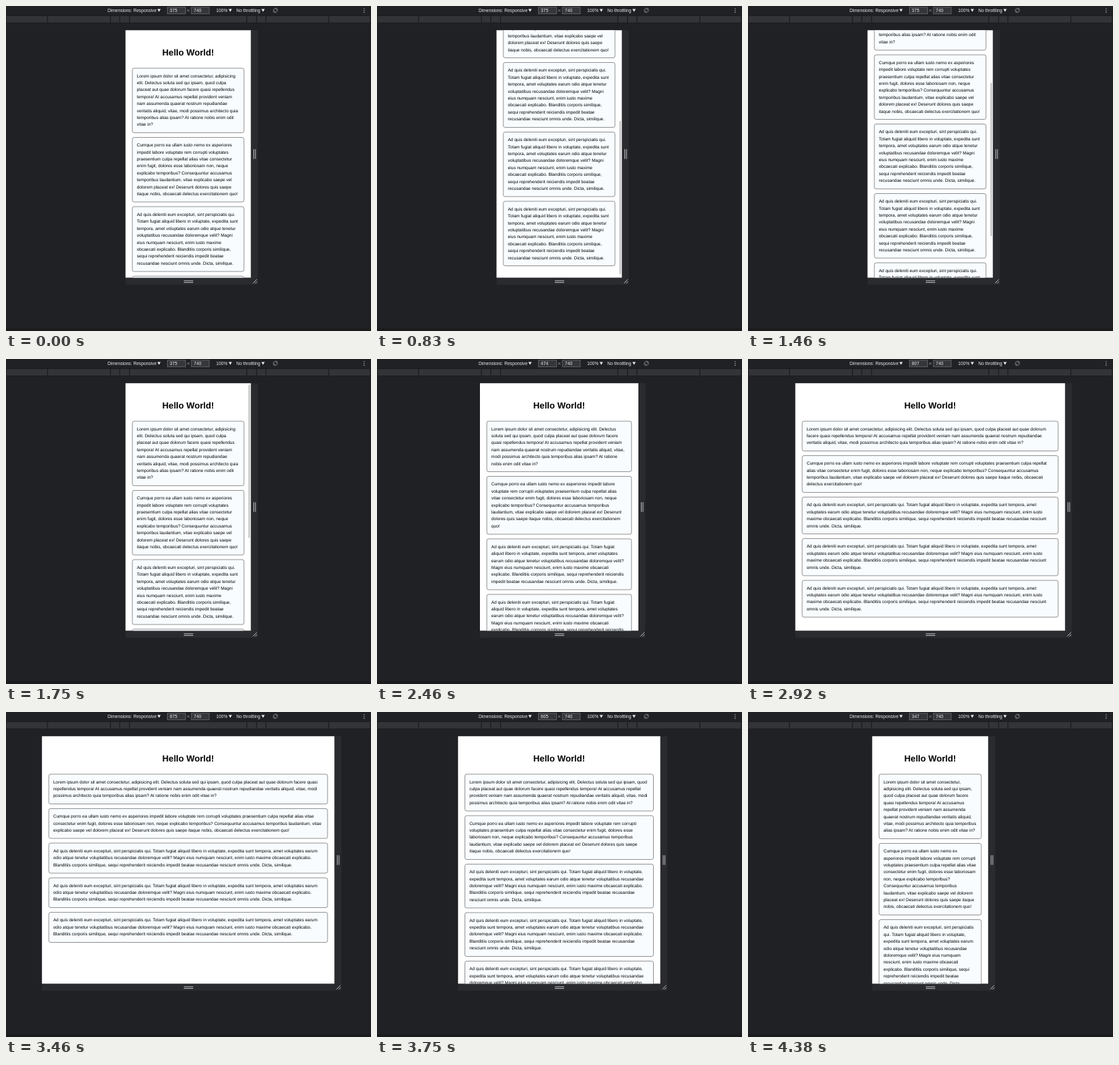
Animation, 546 px wide and 486 px high, one loop 5.21 s. Source, as an HTML page:

```html
<!DOCTYPE html>
<html lang="en">
<head>
<meta charset="utf-8">
<title>Responsive preview</title>
<style>
  html, body { margin: 0; width: 100%; height: 100%; overflow: hidden; background: #202124; }
  #stage { position: relative; width: 546px; height: 486px; overflow: hidden; background: #202124; }
  #chrome { position: absolute; left: 0; top: 0; }
  #chrome text { font: 6.65px "Liberation Sans", Arial, sans-serif; fill: #e8eaed; }
  #view {
    position: absolute; left: 0; top: 0; height: 740px; overflow: hidden;
    background: #fff; transform-origin: 0 0;
  }
  #page {
    box-sizing: border-box; padding: 20px;
    font: 13px/1.6 "Liberation Sans", Arial, sans-serif; color: #000;
    text-rendering: geometricPrecision;
  }
  h1 { margin: 25.5px 0; font-size: 26.4px; line-height: 41.6px; text-align: center; }
  #page p {
    margin: 0 0 13px; padding: 13px; border: 1px solid #222;
    border-radius: 6px; background: #f8fcff;
  }
  #thumb {
    position: absolute; right: 3px; width: 4px; height: 459px;
    border-radius: 2px; background: #bcbcbc;
  }
</style>
</head>
<body>
<div id="stage">
  <svg id="chrome" width="546" height="486" viewBox="0 0 546 486">
    <rect y="15" width="546" height="10" fill="#333438"/>
    <path id="ticks" stroke="#17181a" stroke-width="1.1"/>
    <path d="M0 14.3H546M0 25.2H546" stroke="#1a1b1d" stroke-width=".8"/>
    <rect y="482" width="546" height="4" fill="#1a1b1d"/>

    <text x="152" y="9">Dimensions: Responsive</text>
    <g fill="#35363a" stroke="#6a6d71" stroke-width=".8">
      <rect x="241.4" y="1.9" width="27.2" height="9.8"/>
      <rect x="277.2" y="1.9" width="26.8" height="9.8"/>
    </g>
    <text id="width" x="245" y="9">375</text>
    <path d="M270.8 5l3.6 3.6m0-3.6l-3.6 3.6" stroke="#9aa0a6" stroke-width=".7"/>
    <text x="281" y="9">740</text>
    <text x="314.3" y="9">100%</text>
    <text x="344.5" y="9">No throttling</text>
    <path d="M226.4 4.6h5l-2.5 4.2zM333 4.6h5l-2.5 4.2zM382 4.6h5l-2.5 4.2z" fill="#e8eaed"/>
    <g fill="none" stroke="#9aa0a6" stroke-width=".8">
      <rect x="401.2" y="3.7" width="3.6" height="5.6" transform="rotate(-45 403 6.5)"/>
      <path d="M399.6 7.2a3.5 3.5 0 0 0 3 2.8M406.4 5.8a3.5 3.5 0 0 0-3-2.8"/>
    </g>
    <g fill="#9aa0a6">
      <circle cx="535.7" cy="4" r=".8"/><circle cx="535.7" cy="6.7" r=".8"/><circle cx="535.7" cy="9.4" r=".8"/>
    </g>

    <rect id="frame" y="36.25" height="380.5" fill="#2a2b2e"/>
    <g fill="none" stroke="#c0c2c5" stroke-width="1">
      <path d="M266 410.9h14M266 413.4h14"/>
      <path id="grips" d="M4.4 214.2v14.5M6.9 214.2v14.5M3.2 414.6l5.8-5.8M6.4 414.8l2.8-2.8"/>
    </g>
  </svg>
  <div id="view">
    <div id="page"><h1>Hello World!</h1></div>
    <div id="thumb"></div>
  </div>
</div>
<script>
const $ = id => document.getElementById(id);
const LOOP = 5210, FRAME = 1000 / 24, CENTER = 272.5, TOP = 36.25, SCROLL_MAX = 431;

const repeated = "Ad quis deleniti eum excepturi, sint perspiciatis qui. Totam fugiat aliquid libero in voluptate, expedita sunt tempora, amet voluptates earum odio atque tenetur voluptatibus recusandae doloremque velit? Magni eius numquam nesciunt, enim iusto maxime obcaecati explicabo. Blanditiis corporis similique, sequi reprehenderit reiciendis impedit beatae recusandae nesciunt omnis unde. Dicta, similique.";
const paragraphs = [
  "Lorem ipsum dolor sit amet consectetur, adipisicing elit. Delectus soluta sed qui ipsam, quod culpa placeat aut quae dolorum facere quasi repellendus tempora! At accusamus repellat provident veniam nam assumenda quaerat nostrum repudiandae veritatis aliquid, vitae, modi possimus architecto quia temporibus alias ipsam? At ratione nobis enim odit vitae in?",
  "Cumque porro ea ullam iusto nemo ex asperiores impedit labore voluptate rem corrupti voluptates praesentium culpa repellat alias vitae consectetur enim fugit, dolores esse laboriosam non, neque explicabo temporibus? Consequuntur accusamus temporibus laudantium, vitae explicabo saepe vel dolorem placeat ex! Deserunt dolores quis saepe itaque nobis, obcaecati delectus exercitationem quo!",
  repeated, repeated, repeated
];
for (const text of paragraphs) {
  const p = document.createElement("p");
  p.textContent = text;
  $("page").append(p);
}

// Breakpoint marks, mirrored around the centre
$("ticks").setAttribute("d", [87.7, 102.3, 116.3, 210.4, 272.4]
  .map(x => `M${CENTER - x} 15v10M${CENTER + x} 15v10`).join(""));

const easeIn = u => u ** 1.75;
const easeOut = u => 1 - (1 - u) ** 1.75;
const easeInOut = u => u < .5 ? 2 * u * u : 1 - 2 * (1 - u) ** 2;

// Steps: [start tick, end tick, from, to, easing], 24 ticks per second
const scrollSteps = [
  [13, 20, 0, SCROLL_MAX, easeInOut],
  [29, 42, SCROLL_MAX, 0, easeInOut]
];
const widthSteps = [
  [50, 64, 375, 589, easeIn],
  [64, 75, 589, 880, easeOut],
  [82, 95, 880, 490, easeInOut],
  [96, 105, 490, 347, easeInOut]
];

function valueAt(steps, tick) {
  let value = steps[0][2];
  for (const [start, end, from, to, ease] of steps) {
    if (tick < start) break;
    value = from + (to - from) * ease(Math.min(1, (tick - start) / (end - start)));
  }
  return value;
}

function draw(ms) {
  const tick = Math.floor((ms % LOOP + 5) / FRAME) % 125;
  const width = Math.round(valueAt(widthSteps, tick));
  const scroll = Math.round(valueAt(scrollSteps, tick));
  const left = CENTER - width / 4, right = CENTER + width / 4;

  $("width").textContent = width;
  $("view").style.width = width + "px";
  $("view").style.transform = `translate(${left}px, ${TOP}px) scale(.5)`;
  $("page").style.transform = `translateY(${-scroll}px)`;
  $("thumb").style.top = 4 + 267 * scroll / SCROLL_MAX + "px";
  $("thumb").style.visibility = tick >= 14 && tick <= 50 ? "visible" : "hidden";
  $("frame").setAttribute("x", left);
  $("frame").setAttribute("width", right - left + 10.5);
  $("grips").setAttribute("transform", `translate(${right})`);
}

const began = performance.now();
function play() {
  draw(performance.now() - began);
  requestAnimationFrame(play);
}
play();
</script>
</body>
</html>
```
